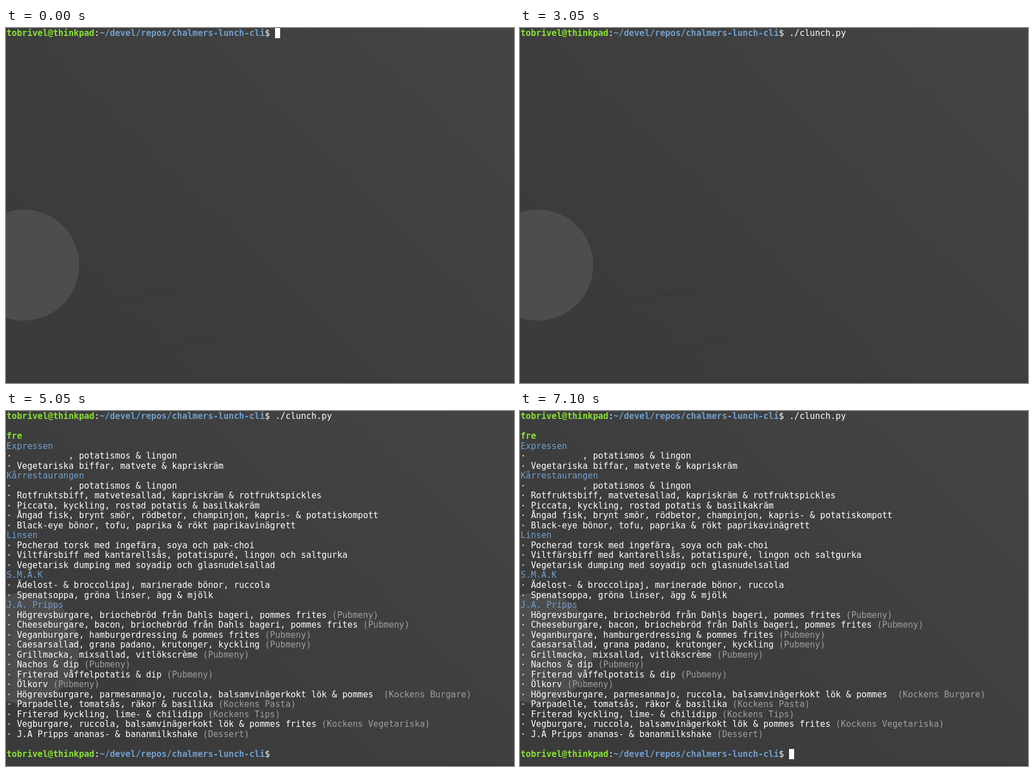
Write an HTML page with a canvas that moves like this. It is 895 px wide and 626 px high and loops after 8 s.

```html
<!DOCTYPE html>
<html lang="sv">
<head>
<meta charset="utf-8">
<title>Lunch in the terminal</title>
<style>
  html, body { margin: 0; width: 100%; height: 100%; overflow: hidden; background: #3d3d3d; }
  canvas { display: block; }
</style>
</head>
<body>
<canvas id="stage" width="895" height="626"></canvas>
<script>
const canvas = document.getElementById('stage');
const ctx = canvas.getContext('2d');
const LOOP = 8000;
const LEFT = 1, CELL_W = 9.1, CELL_H = 17.53, BASELINE = 14;
const FONT = '15.12px "DejaVu Sans Mono", monospace';
const GREEN = '#8ae234', BLUE = '#729fcf', WHITE = '#ffffff', DIM = '#9f9f9f';

const COMMAND = './clunch.py';
const PROMPT = [
  ['tobrivel@thinkpad', GREEN, true],
  [':', WHITE],
  ['~/devel/repos/chalmers-lunch-cli', BLUE, true],
  ['$ ', WHITE]
];
const PROMPT_LENGTH = PROMPT.reduce((sum, [text]) => sum + text.length, 0);
const BLINK_WORD = 'Köttbullar';
const MENU_ROW = 3, LAST_ROW = 34;
const MENU = `Expressen
· Köttbullar, potatismos & lingon
· Vegetariska biffar, matvete & kapriskräm
Kårrestaurangen
· Köttbullar, potatismos & lingon
· Rotfruktsbiff, matvetesallad, kapriskräm & rotfruktspickles
· Piccata, kyckling, rostad potatis & basilkakräm
· Ångad fisk, brynt smör, rödbetor, champinjon, kapris- & potatiskompott
· Black-eye bönor, tofu, paprika & rökt paprikavinägrett
Linsen
· Pocherad torsk med ingefära, soya och pak-choi
· Viltfärsbiff med kantarellsås, potatispuré, lingon och saltgurka
· Vegetarisk dumping med soyadip och glasnudelsallad
S.M.A.K
· Ädelost- & broccolipaj, marinerade bönor, ruccola
· Spenatsoppa, gröna linser, ägg & mjölk
J.A. Pripps
· Högrevsburgare, briochebröd från Dahls bageri, pommes frites (Pubmeny)
· Cheeseburgare, bacon, briochebröd från Dahls bageri, pommes frites (Pubmeny)
· Veganburgare, hamburgerdressing & pommes frites (Pubmeny)
· Caesarsallad, grana padano, krutonger, kyckling (Pubmeny)
· Grillmacka, mixsallad, vitlökscrème (Pubmeny)
· Nachos & dip (Pubmeny)
· Friterad våffelpotatis & dip (Pubmeny)
· Ölkorv (Pubmeny)
· Högrevsburgare, parmesanmajo, ruccola, balsamvinägerkokt lök & pommes  (Kockens Burgare)
· Parpadelle, tomatsås, räkor & basilika (Kockens Pasta)
· Friterad kyckling, lime- & chilidipp (Kockens Tips)
· Vegburgare, ruccola, balsamvinägerkokt lök & pommes frites (Kockens Vegetariska)
· J.A Pripps ananas- & bananmilkshake (Dessert)`.split('\n');

// Times at which the cursor and the blinking word switch state.
const PASTE = 150, ENTER = 3250, OUTPUT = 4550;
const CURSOR_FLIPS = [600, 1200, 3050, 3250, 3900, 4400, 5050, 5700, 6300, 6850];
const WORD_FLIPS = [4700, 5250, 5950, 6500, 7100];
const isOn = (flips, t) => flips.filter(time => time <= t).length % 2 === 0;

function faintLine(x1, y1, x2, y2) {
  const fade = ctx.createLinearGradient(x1, y1, x2, y2);
  fade.addColorStop(0, 'rgba(48,48,48,0)');
  fade.addColorStop(0.3, 'rgba(48,48,48,0.4)');
  fade.addColorStop(1, 'rgba(48,48,48,0.3)');
  ctx.strokeStyle = fade;
  ctx.lineWidth = 2;
  ctx.beginPath();
  ctx.moveTo(x1, y1);
  ctx.lineTo(x2, y2);
  ctx.stroke();
}

function drawBackground() {
  const shade = ctx.createLinearGradient(170, 520, 740, -60);
  shade.addColorStop(0, '#3b3b3b');
  shade.addColorStop(0.5, '#3e3f3e');
  shade.addColorStop(1, '#434443');
  ctx.fillStyle = shade;
  ctx.fillRect(0, 0, 895, 626);
  faintLine(180, 479, 455, 449);
  faintLine(125, 592, 505, 523);
  faintLine(485, 614, 552, 600);
  ctx.fillStyle = '#4d4d4d';
  ctx.beginPath();
  ctx.arc(31, 418, 98, 0, Math.PI * 2);
  ctx.fill();
  ctx.fillStyle = '#3b393a';
  ctx.fillRect(0, 622, 895, 4);
}

function write(row, col, text, color, bold) {
  ctx.font = (bold ? 'bold ' : '') + FONT;
  ctx.fillStyle = color;
  [...text].forEach((char, i) => {
    ctx.fillText(char, LEFT + (col + i) * CELL_W, BASELINE + row * CELL_H);
  });
}

function drawPrompt(row) {
  let col = 0;
  for (const [text, color, bold] of PROMPT) {
    write(row, col, text, color, bold);
    col += text.length;
  }
}

function drawMenu(wordVisible) {
  write(2, 0, 'fre', GREEN, true);
  MENU.forEach((line, i) => {
    const row = MENU_ROW + i;
    if (!line.startsWith('·')) return write(row, 0, line, BLUE);
    const noteAt = line.includes('(') ? line.indexOf('(') : line.length;
    let dish = line.slice(0, noteAt);
    if (!wordVisible) dish = dish.replace(BLINK_WORD, ' '.repeat(BLINK_WORD.length));
    write(row, 0, dish, WHITE);
    write(row, noteAt, line.slice(noteAt), DIM);
  });
}

function drawCursor(row, col) {
  const x = Math.round(LEFT + col * CELL_W), y = Math.floor(row * CELL_H);
  ctx.fillStyle = WHITE;
  ctx.fillRect(x, y, 9, 18);
}

function cursorCell(t) {
  if (t < PASTE) return [0, PROMPT_LENGTH];
  if (t < ENTER) return [0, PROMPT_LENGTH + COMMAND.length];
  return t < OUTPUT ? [1, 0] : [LAST_ROW, PROMPT_LENGTH];
}

function draw(t) {
  drawBackground();
  drawPrompt(0);
  if (t >= PASTE) write(0, PROMPT_LENGTH, COMMAND, WHITE);
  if (t >= OUTPUT) {
    drawMenu(isOn(WORD_FLIPS, t));
    drawPrompt(LAST_ROW);
  }
  if (isOn(CURSOR_FLIPS, t)) drawCursor(...cursorCell(t));
}

const start = performance.now();
function tick() {
  draw((performance.now() - start) % LOOP);
  requestAnimationFrame(tick);
}
tick();
</script>
</body>
</html>
```
